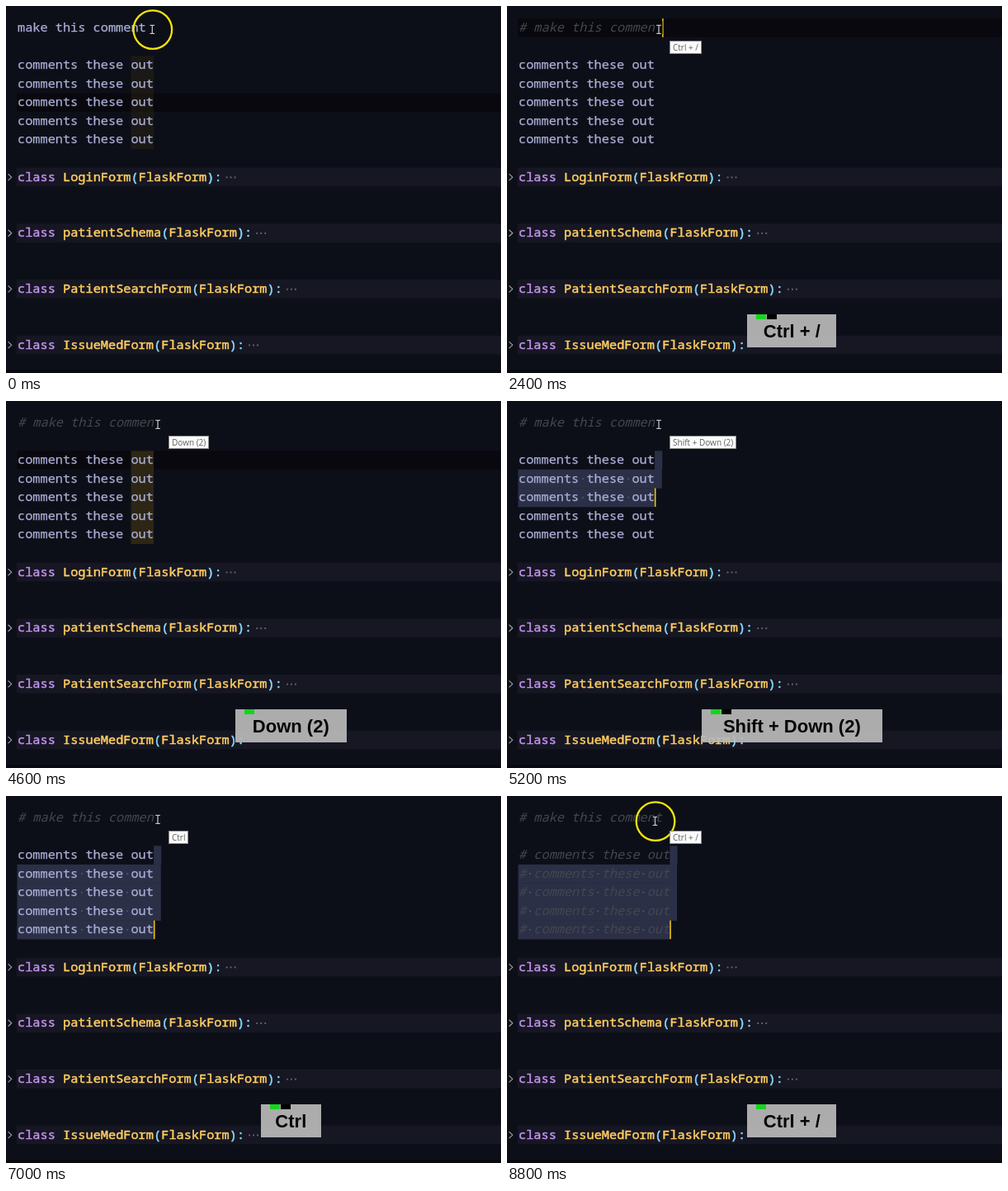
Write an HTML page with a canvas that moves like this. It is 600 by 444 pixels and loops after 9000 ms.

```html
<!DOCTYPE html>
<html lang="en">
<head>
<meta charset="utf-8">
<title>Commenting lines</title>
<style>
  html, body { margin: 0; width: 100%; height: 100%; overflow: hidden; background: #0d0f18; }
  canvas { display: block; }
</style>
</head>
<body>
<canvas id="stage" width="600" height="444"></canvas>
<script>
const ctx = document.getElementById('stage').getContext('2d');
const LOOP = 9000, LEFT = 14, CHAR = 9.17, ROW = 22.56;
const CODE = '15.28px "Noto Sans Mono", monospace';
const COLOR = {
  bg: '#0d0f18', active: '#08080e', fold: '#161723', text: '#acafd6', comment: '#45474d',
  keyword: '#c290ec', name: '#ffcd60', punct: '#89ddff', select: '#2b3047', match: '#2d2614'
};

const CLICK = 300, FIRST_COMMENT = 2000, SELECT = 5000, LAST_COMMENT = 7600;

// Key presses: [time, label]
const KEYS = [
  [1700, 'Ctrl'], [FIRST_COMMENT, 'Ctrl + /'], [3300, 'Down'], [4100, 'Down (2)'],
  [4800, 'Shift'], [SELECT, 'Shift + Down'], [5200, 'Shift + Down (2)'],
  [5600, 'Shift + Down (3)'], [6000, 'Shift + Down (4)'],
  [6700, 'Ctrl'], [LAST_COMMENT, 'Ctrl + /']
];
const MODIFIER_HELD = [[1700, 2700], [4800, 6500], [6700, 8050]];

// Caret positions: [time, row, column]
const CARETS = [
  [0, 4, 18], [CLICK, 0, 17], [FIRST_COMMENT, 0, 19], [3300, 1, 0], [4100, 2, 18],
  [SELECT, 3, 18], [5200, 4, 18], [5600, 5, 18], [6000, 6, 18], [LAST_COMMENT, 6, 20]
];
const CLASSES = [[8, 'LoginForm'], [11, 'patientSchema'], [14, 'PatientSearchForm'], [17, 'IssueMedForm']];

const clamp = v => Math.max(0, Math.min(1, v));
const ramp = (t, from, to) => clamp((t - from) / (to - from));
const latest = (list, t) => list.filter(item => item[0] <= t).pop();
const colX = col => LEFT + col * CHAR;
const rowTop = row => 15.2 + row * ROW;
const baseline = row => 31.1 + row * ROW;

function box(x, y, w, h, color) {
  ctx.fillStyle = color;
  ctx.fillRect(x, y, w, h);
}

// The outline thickens the letters to a weight between regular and bold.
function write(str, x, y, color, font = CODE, outline = 0) {
  ctx.font = font;
  ctx.fillStyle = ctx.strokeStyle = color;
  ctx.fillText(str, x, y);
  if (!outline) return;
  ctx.lineWidth = outline;
  ctx.lineJoin = 'round';
  ctx.strokeText(str, x, y);
}

function writeCode(str, row, commented) {
  if (commented) write('# ' + str, LEFT, baseline(row), COLOR.comment, 'italic ' + CODE);
  else write(str, LEFT, baseline(row), COLOR.text, CODE, 0.25);
}

function withAlpha(alpha, draw) {
  ctx.save();
  ctx.globalAlpha = alpha;
  draw();
  ctx.restore();
}

function drawClass(row, name) {
  const y = baseline(row);
  box(13, rowTop(row), 587, ROW, COLOR.fold);
  ctx.strokeStyle = '#a0a2aa';
  ctx.lineWidth = 1.1;
  ctx.beginPath();
  ctx.moveTo(2.5, y - 8.5);
  ctx.lineTo(6.8, y - 4.5);
  ctx.lineTo(2.5, y - 0.5);
  ctx.stroke();
  let col = 0;
  const parts = [['class ', COLOR.keyword], [name, COLOR.name], ['(', COLOR.punct],
    ['FlaskForm', COLOR.name], ['):', COLOR.punct]];
  for (const [str, color] of parts) {
    write(str, colX(col), y, color, CODE, 0.5);
    col += str.length;
  }
  for (let i = 0; i < 3; i++) box(colX(col) + 5 + i * 5, y - 5.2, 1.9, 1.9, '#62646f');
}

function drawMatches(t, row) {
  const outAlpha = t < CLICK ? 0.45 * (1 - ramp(t, 50, CLICK))
    : t < SELECT ? ramp(t, 4300, 4450) : 0;
  withAlpha(outAlpha, () => box(colX(15), rowTop(2), 3 * CHAR, 5 * ROW, COLOR.match));
  if (row === 0 && t < FIRST_COMMENT)
    withAlpha(ramp(t, 500, 650), () => box(colX(10), rowTop(0), 7 * CHAR, ROW, COLOR.match));
}

function drawSelection(row, col) {
  box(colX(col), rowTop(2), CHAR, ROW, COLOR.select);
  for (let r = 3; r <= row; r++)
    box(LEFT - 0.5, rowTop(r), (col + (r < row)) * CHAR, ROW + 0.3, COLOR.select);
}

function drawLines(t, caretRow) {
  const done = t >= LAST_COMMENT;
  const line = 'comments these out';
  writeCode('make this comment', 0, t >= FIRST_COMMENT);
  for (let row = 2; row <= 6; row++) {
    writeCode(line, row, done);
    if (t < SELECT || row < 3 || row > caretRow) continue;
    [...(done ? '# ' + line : line)].forEach((ch, i) => {
      if (ch === ' ') box(colX(i + 0.5) - 0.8, baseline(row) - 5.5, 1.7, 1.7, '#555a6c');
    });
  }
}

function drawPointer(t) {
  const away = t < 4500 ? 1 - ramp(t, 50, 400) : ramp(t, 8250, 8600);
  const x = 184 - away * (t < 4500 ? 6.7 : 4.5);
  const y = 28.3 + (t < 4500 ? 0 : away * 2);
  // The pointer hides the letter it rests on.
  if (t >= FIRST_COMMENT && away < 0.5)
    box(179.5, 18, 9, 16, t < 3300 ? COLOR.active : COLOR.bg);

  const ring = t < 4500 ? 1 - ramp(t, 250, 600) : ramp(t, 8300, 8600);
  withAlpha(ring, () => {
    ctx.strokeStyle = '#f4e409';
    ctx.lineWidth = 2.3;
    ctx.beginPath();
    ctx.arc(x + 0.5, y + 0.3, 23.3, 0, Math.PI * 2);
    ctx.stroke();
  });

  for (const [color, width] of [['#05060a', 3.2], ['#c4c5ca', 1.3]]) {
    ctx.strokeStyle = color;
    ctx.lineWidth = width;
    ctx.beginPath();
    for (const end of [-5, 5]) {
      ctx.moveTo(x - 2.8, y + end);
      ctx.lineTo(x + 2.8, y + end);
    }
    ctx.moveTo(x, y - 5);
    ctx.lineTo(x, y + 5);
    ctx.stroke();
  }
}

function drawKeys(t) {
  const key = latest(KEYS, t);
  if (!key) return;
  const label = key[1];

  ctx.font = '10px "Open Sans", sans-serif';
  const tipWidth = Math.round(ctx.measureText(label).width + 8);
  box(197, 42, tipWidth, 16, '#8d8d8d');
  box(198, 43, tipWidth - 2, 14, '#fbfbfb');
  write(label, 201, 53.6, '#626262', ctx.font);

  ctx.font = 'bold 22px "Liberation Sans", Arial, sans-serif';
  const textWidth = ctx.measureText(label).width;
  const width = Math.round(30 + textWidth * 1.133);
  const left = Math.round(345.3 - width / 2);
  withAlpha(0.92, () => box(left, 373, width, 40, '#bababa'));
  write(label, 345.3 - textWidth / 2, 400.8, '#050505', ctx.font);
  box(left + 11, 373, 12, 6, '#14d61c');
  if (MODIFIER_HELD.some(([from, to]) => t >= from && t < to))
    box(left + 24, 373, 12, 6, '#000');
}

function draw(t) {
  const [moved, row, col] = latest(CARETS, t);
  box(0, 0, 600, 444, COLOR.bg);
  box(0, 440, 600, 4, '#090a10');
  CLASSES.forEach(([r, name]) => drawClass(r, name));
  if (t < SELECT) box(13, rowTop(row), 587, ROW, COLOR.active);
  drawMatches(t, row);
  if (t >= SELECT) drawSelection(row, col);
  drawLines(t, row);
  const caretOn = moved > 0 && (t - moved) % 1000 < 500;
  if (caretOn) box(colX(col) - 0.2, rowTop(row), 1.6, ROW, '#f0c419');
  drawPointer(t);
  drawKeys(t);
}

function tick() {
  draw(performance.now() % LOOP);
  requestAnimationFrame(tick);
}
tick();
</script>
</body>
</html>
```
